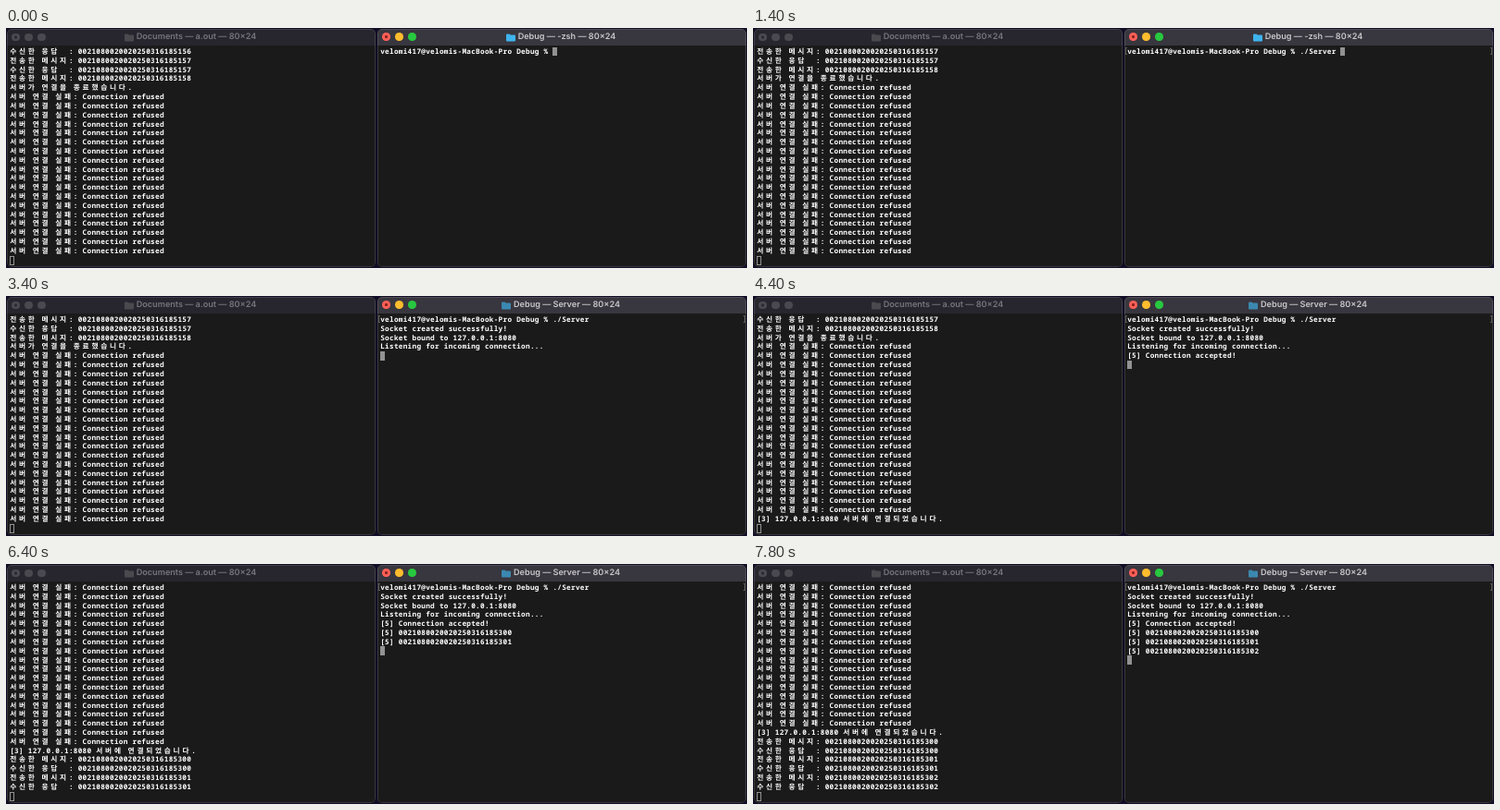
Animation, 800 px wide and 260 px high, one loop 8 s. Source, as an HTML page:

```html
<!DOCTYPE html>
<html lang="ko">
<head>
<meta charset="utf-8">
<title>Terminals</title>
<style>
  html, body { margin: 0; width: 800px; height: 260px; overflow: hidden; background: #120d26; }
  body { position: relative; text-rendering: geometricPrecision; }
  .win {
    position: absolute; top: 1px; width: 398px; height: 258px;
    border-radius: 5px; overflow: hidden; background: #1a1a1a;
  }
  .win::after {
    content: ""; position: absolute; inset: 0; border-radius: 5px;
    box-shadow: inset 0 0 0 1px #ffffff20;
  }
  #client { left: 1px; }
  #server { left: 401px; }

  .bar {
    height: 18px; display: flex; align-items: center; justify-content: center; gap: 3px;
    font: 600 9.1px/18px Inter, sans-serif; color: #77757c; background: #27252e;
    white-space: pre; padding-right: 2px;
  }
  .bar b { font-weight: inherit; }
  #server .bar { color: #c9c8cb; background: #38363e; }
  .dot { position: absolute; top: 4.7px; width: 8.6px; height: 8.6px; border-radius: 50%; background: #4b4950; }
  .dot:nth-of-type(1) { left: 5.3px; background: radial-gradient(circle, #2b2930 1.2px, #4b4950 2px); }
  .dot:nth-of-type(2) { left: 19.2px; }
  .dot:nth-of-type(3) { left: 33.1px; }
  #server .dot { top: 4.3px; }
  #server .dot:nth-of-type(1) { background: radial-gradient(circle, #86201b 1.2px, #ff5f57 2px); }
  #server .dot:nth-of-type(2) { background: #febc2e; }
  #server .dot:nth-of-type(3) { background: #28c840; }
  .folder { width: 10px; height: 9px; fill: #4a494e; }
  #server .folder { fill: #3fb3ee; }
  #server.running .folder { fill: #3b88b0; }

  .screen {
    --cell: 4.9px; --row: 9.82px;
    position: absolute; left: 3.2px; top: 21px; white-space: pre; color: #fff;
    font: 600 7.7px/var(--row) "Noto Sans Mono", "Noto Sans CJK KR", "Noto Sans CJK", monospace;
    letter-spacing: calc(var(--cell) - 1ch);
  }
  .screen div { height: var(--row); }
  .screen i { display: inline-block; width: calc(var(--cell) * 2); font-style: normal; letter-spacing: 0; }
  .cursor {
    position: absolute; box-sizing: border-box; width: 5px; height: 9.8px; background: #929292;
  }
  #client .cursor { left: 3.2px; top: 245.8px; background: none; border: 1px solid #929292; }
  .mark { position: absolute; top: 20px; width: 2px; height: 8px; box-sizing: border-box; border: 1px solid #5c5c5c; visibility: hidden; }
  .mark.open { left: 1px; border-right: 0; }
  .mark.close { left: 395px; border-left: 0; }
  .entered .mark { visibility: visible; }
</style>
</head>
<body>
<section class="win" id="client">
  <span class="dot"></span><span class="dot"></span><span class="dot"></span>
  <div class="bar"><svg class="folder" viewBox="0 0 10 9"><path d="M0 1.5Q0 .5 1 .5H3.5L4.7 1.5H9Q10 1.5 10 2.5V7.5Q10 8.5 9 8.5H1Q0 8.5 0 7.5Z"/></svg><b>Documents — a.out — 80×24</b></div>
  <div class="screen"></div>
  <div class="cursor"></div>
</section>
<section class="win" id="server">
  <span class="dot"></span><span class="dot"></span><span class="dot"></span>
  <div class="bar"><svg class="folder" viewBox="0 0 10 9"><path d="M0 1.5Q0 .5 1 .5H3.5L4.7 1.5H9Q10 1.5 10 2.5V7.5Q10 8.5 9 8.5H1Q0 8.5 0 7.5Z"/></svg><b></b></div>
  <div class="mark open"></div><div class="mark close"></div>
  <div class="screen"></div>
  <div class="cursor"></div>
</section>
<script>
const LOOP = 8000, ROWS = 23, CELL = 4.9, ROW = 9.82;
const $ = s => document.querySelector(s);
const client = $('#client'), server = $('#server');

const stamp = s => '0021080020020250316185' + s;
const sent = s => '전송한 메시지: ' + stamp(s);
const received = s => '수신한 응답  : ' + stamp(s);
const pair = s => [sent(s), received(s)];

const clientLog = [
  received('156'), ...pair('157'), sent('158'),
  '서버가 연결을 종료했습니다.',
  ...Array(19).fill('서버 연결 실패: Connection refused'),
  '[3] 127.0.0.1:8080 서버에 연결되었습니다.',
  ...pair('300'), ...pair('301'), ...pair('302')
];
const prompt = 'velomi417@velomis-MacBook-Pro Debug % ';
const serverLog = [
  'Socket created successfully!',
  'Socket bound to 127.0.0.1:8080',
  'Listening for incoming connection...',
  '[5] Connection accepted!',
  ...['300', '301', '302'].map(s => '[5] ' + stamp(s))
];

// Last value whose start time has been reached.
const at = (t, steps) => steps.reduce((v, [start, next]) => t >= start ? next : v, null);

const typed = [[0, ''], [200, '.'], [400, './'], [600, './S'], [800, './Se'], [1000, './Server ']];
const clientCount = [[0, 23], [1400, 24], [4400, 25], [5400, 27], [6400, 29], [7400, 31]];
const serverCount = [[0, 0], [2400, 3], [4400, 4], [5400, 5], [6400, 6], [7400, 7]];

// Hangul takes two cells of the terminal grid.
const toHtml = lines => lines
  .map(l => '<div>' + l.replace(/[가-힣]/g, '<i>$&</i>') + '</div>').join('');

function setScreen(win, lines) {
  win.querySelector('.screen').innerHTML = toHtml(lines);
}

function render(command, seen, printed, entered, running) {
  setScreen(client, clientLog.slice(seen - ROWS, seen));
  setScreen(server, [prompt + command, ...serverLog.slice(0, printed)]);
  server.classList.toggle('entered', entered);
  server.classList.toggle('running', running);
  server.querySelector('.bar b').textContent = `Debug — ${running ? 'Server' : '-zsh'} — 80×24`;
  const col = running ? 0 : (prompt + command).length;
  const row = running ? printed + 1 : 0;
  const cursor = server.querySelector('.cursor').style;
  cursor.left = 3 + col * CELL + 'px';
  cursor.top = 19.5 + row * ROW + 'px';
}

let shown = '';
function tick() {
  const t = performance.now() % LOOP;
  const state = [at(t, typed), at(t, clientCount), at(t, serverCount), t >= 1400, t >= 2200];
  const key = state.join('|');
  if (key !== shown) {
    shown = key;
    render(...state);
  }
  requestAnimationFrame(tick);
}
tick();
</script>
</body>
</html>
```
